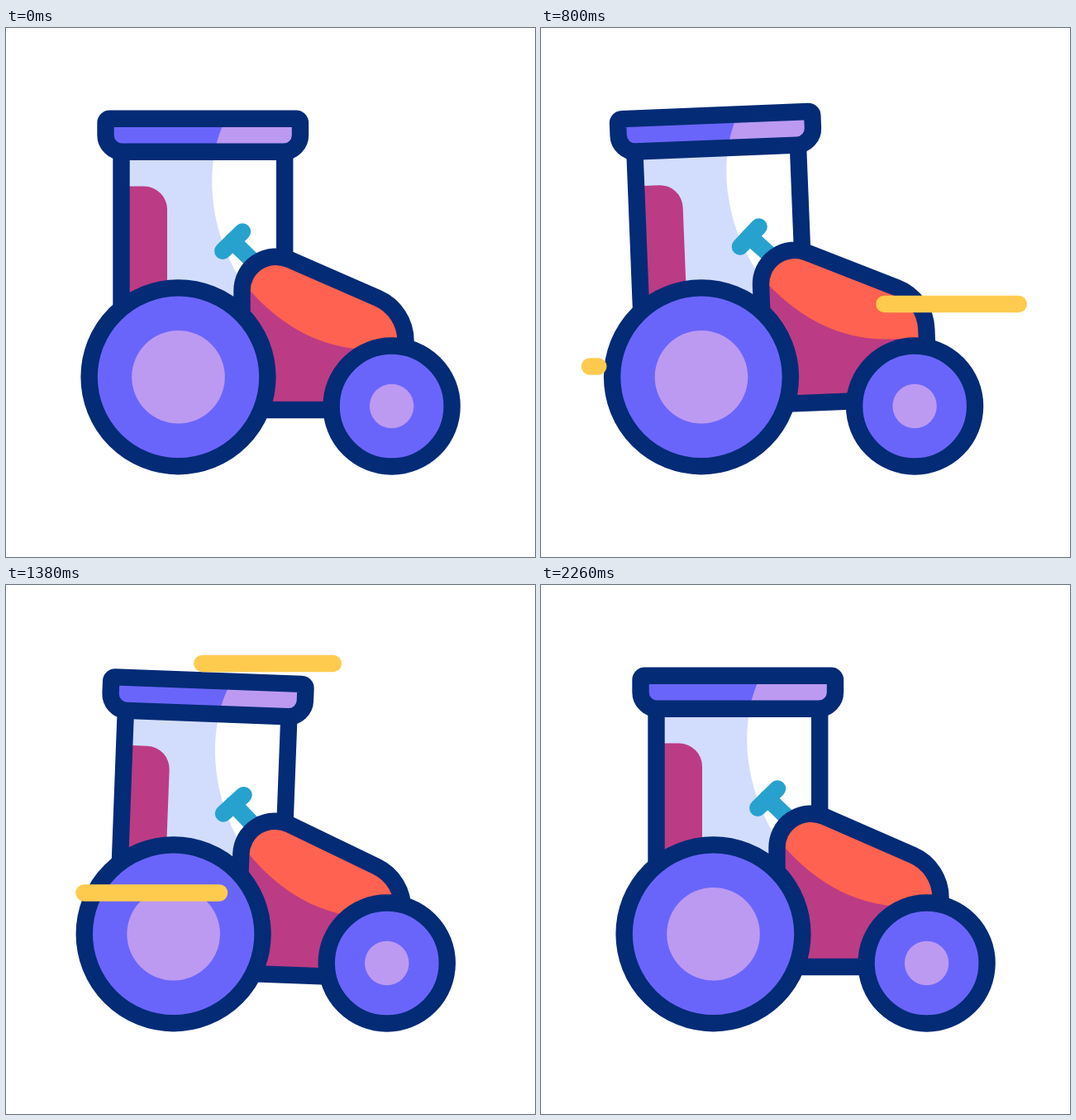
An HTML page with a canvas that plays this animation: 640 by 640 pixels, repeating every 2.4 s.

```html
<!DOCTYPE html>
<html lang="en">
<head>
<meta charset="utf-8">
<title>Tractor</title>
<style>
  html, body { margin: 0; width: 100%; height: 100%; overflow: hidden; background: #fff; }
  canvas { display: block; width: 100%; height: 100%; }
</style>
</head>
<body>
<canvas id="stage" width="640" height="640"></canvas>
<script>
const LOOP = 2400, STROKE = 20.4;
const STREAK_LENGTH = 200, STREAK_TIME = 400, TAIL_DELAY = 266;
const NAVY = '#032b76', PURPLE = '#6a65fa', LILAC = '#bc9af2', GLASS = '#d2ddfd',
      PLUM = '#bc3b85', ORANGE = '#ff6250', TEAL = '#27a2ce', YELLOW = '#ffcb4f';

const ctx = document.getElementById('stage').getContext('2d');

// Motion: values reached one after another at a steady beat, eased in between.
function ease(p) {
  p = Math.min(1, Math.max(0, p));
  return p * p * (3 - 2 * p);
}

function sample(keys, t) {
  const next = keys.findIndex(([time]) => time > t);
  if (next < 0) return keys[keys.length - 1][1];
  const [t0, a] = keys[next - 1], [t1, b] = keys[next];
  return a + (b - a) * ease((t - t0) / (t1 - t0));
}

const steady = (first, beat, values) =>
  values.map((value, i) => [i && first + beat * (i - 1), value]);

const drift = steady(577, 525, [0, -45, 33, -38, 0]);
const bob = steady(490, 443, [0, 12, -12, 8, -8, 0]);
// Leans against the drift, swinging straight through its middle turn.
const tilt = drift.filter((key, i) => i !== 2).map(([time, x]) => [time, Math.sign(x) * 3]);
tilt[2][1] = 3;

const streaks = [
  { right: 555.5, y: 233, start: 96 },
  { right: 259, y: 409.5, start: 190 },
  { right: 612.5, y: 334, start: 429 },
  { right: 436, y: 95, start: 1000 },
  { right: 261.5, y: 372.5, start: 1084 },
];

// Drawing helpers
function fill(path, color) {
  ctx.fillStyle = color;
  ctx.fill(path);
}

function outline(path) {
  ctx.strokeStyle = NAVY;
  ctx.lineWidth = STROKE;
  ctx.stroke(path);
}

function line(x1, y1, x2, y2, color, cap = 'round') {
  ctx.strokeStyle = color;
  ctx.lineWidth = STROKE;
  ctx.lineCap = cap;
  ctx.beginPath();
  ctx.moveTo(x1, y1);
  ctx.lineTo(x2, y2);
  ctx.stroke();
}

function inside(path, paint) {
  ctx.save();
  ctx.clip(path);
  paint();
  ctx.restore();
}

function box(x, y, width, height, radii) {
  const path = new Path2D();
  path.roundRect(x, y, width, height, radii);
  return path;
}

function disc(x, y, radius) {
  const path = new Path2D();
  path.arc(x, y, radius, 0, 2 * Math.PI);
  return path;
}

// Shapes
const glass = new Path2D('M140 150H252L251 160C246 195 250 250 284 305V345H140Z');
const seat = box(130, 191.5, 65, 155, [0, 28, 0, 0]);
const roof = box(120.5, 109.7, 235.5, 40, [5, 5, 20, 20]);
const roofShine = new Path2D('M266 109H360V155H251Q256 130 266 109Z');
const hoodShine = new Path2D('M285 306C325 355 375 388 440 389H490V260H285Z');

const hood = new Path2D();
hood.moveTo(285.5, 462);
hood.arcTo(285.5, 255, 483.5, 341.6, 41);
hood.arcTo(483.5, 341.6, 483.5, 462, 56);
hood.lineTo(483.5, 462);
hood.closePath();

function drawBody() {
  fill(glass, GLASS);
  fill(seat, PLUM);
  line(262.3, 269.8, 286, 246.5, TEAL);
  line(274, 258, 304, 287, TEAL);
  line(139.5, 150, 139.5, 380, NAVY, 'butt');
  line(337.2, 150, 337.2, 280, NAVY, 'butt');

  fill(hood, PLUM);
  inside(hood, () => fill(hoodShine, ORANGE));
  outline(hood);

  fill(roof, PURPLE);
  inside(roof, () => fill(roofShine, LILAC));
  outline(roof);
}

function drawWheel(x, y, radius, hub) {
  const tyre = disc(x, y, radius);
  fill(tyre, PURPLE);
  outline(tyre);
  fill(disc(x, y, hub), LILAC);
}

function drawStreak({ right, y, start }, t) {
  const head = ease((t - start) / STREAK_TIME);
  const tail = ease((t - start - TAIL_DELAY) / STREAK_TIME);
  if (head > tail) {
    line(right - head * STREAK_LENGTH, y, right - tail * STREAK_LENGTH, y, YELLOW);
  }
}

function draw(t) {
  ctx.clearRect(0, 0, 640, 640);
  ctx.save();
  ctx.translate(sample(drift, t), 0);

  ctx.save();
  ctx.translate(300, 442 + sample(bob, t));
  ctx.rotate(sample(tilt, t) * Math.PI / 180);
  ctx.translate(-300, -442);
  drawBody();
  ctx.restore();

  drawWheel(208.5, 422.3, 107.9, 56.3);
  drawWheel(466.6, 457.5, 73, 26.7);
  ctx.restore();

  streaks.forEach(streak => drawStreak(streak, t));
}

function frame() {
  draw(performance.now() % LOOP);
  requestAnimationFrame(frame);
}
frame();
</script>
</body>
</html>
```
